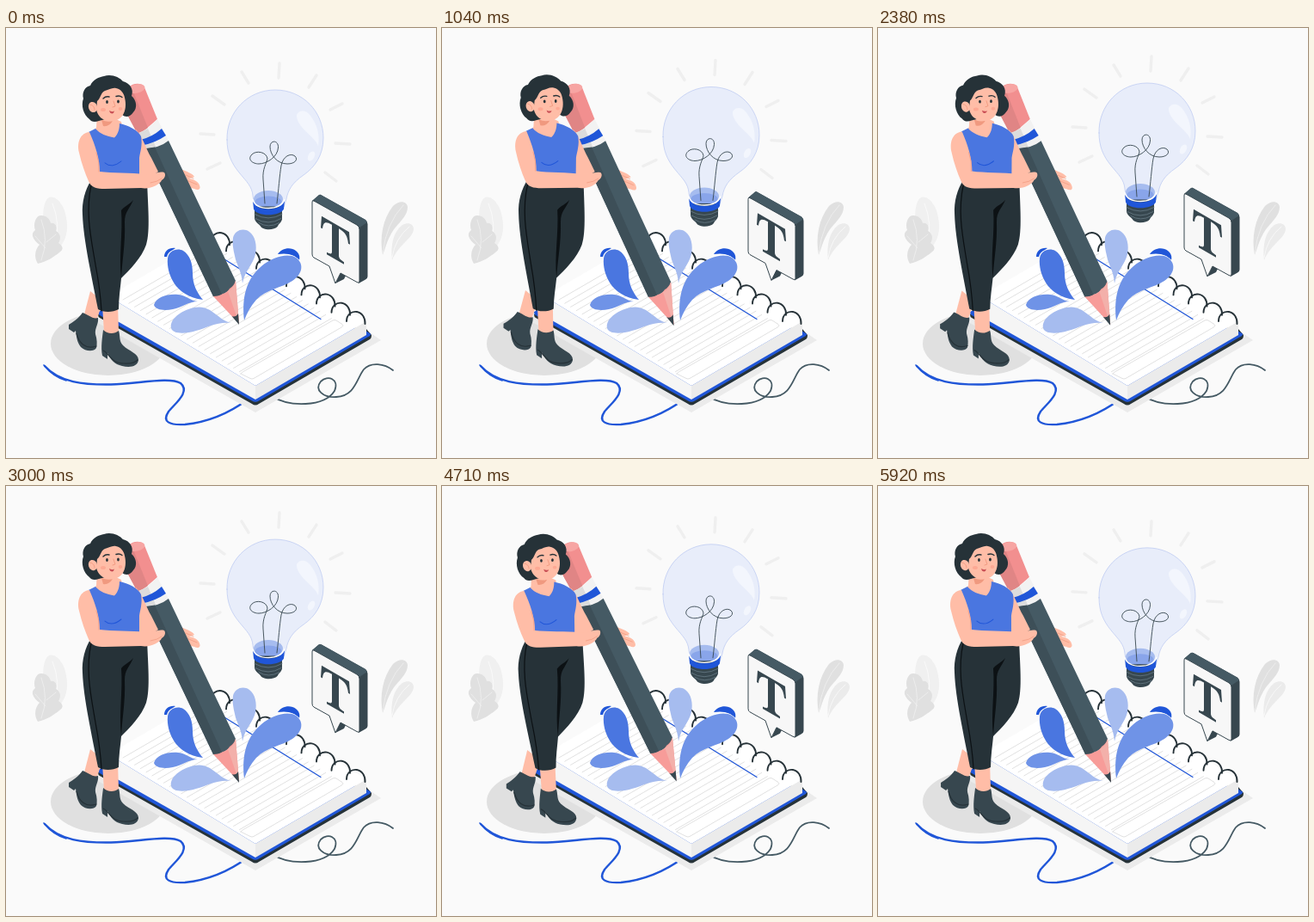
An HTML page with a canvas that plays this animation: 500 by 500 pixels, repeating every 5.96 s.

```html
<!DOCTYPE html>
<html lang="en">
<head>
<meta charset="utf-8">
<title>Creative writing</title>
<style>
html, body { margin: 0; width: 100%; height: 100%; overflow: hidden; background: #fafafa; }
canvas { display: block; width: 500px; height: 500px; }
</style>
</head>
<body>
<canvas id="stage"></canvas>
<script>
const LOOP = 5960;
const INK = '#263238', SLATE = '#455a64', DEEP = '#37474f', SKIN = '#ffbda7';
const BLUE = '#2056d8', MID = '#4a76e0', SOFT = '#6f93e7', PALE = '#a6bcef';

const canvas = document.getElementById('stage');
const ctx = canvas.getContext('2d');
const dpr = window.devicePixelRatio || 1;
canvas.width = canvas.height = 500 * dpr;

function fill(d, color) {
  ctx.fillStyle = color;
  ctx.fill(new Path2D(d));
}

function line(d, color, width = 1) {
  ctx.strokeStyle = color;
  ctx.lineWidth = width;
  ctx.stroke(new Path2D(d));
}

function oval(x, y, rx, ry, color, turn = 0) {
  ctx.beginPath();
  ctx.ellipse(x, y, rx, ry, turn, 0, 7);
  ctx.fillStyle = color;
  ctx.fill();
}

function drawLeaves() {
  fill('M50 250 C41 232 41 202 50 197 C58 194 68 206 70 220 C73 236 70 246 61 257 Z', '#f0f0f0');
  line('M54 204 Q64 228 57 255', '#fafafa', 1);
  fill('M37 274 C32 266 34 257 39 252 C31 246 28 239 34 235 C31 228 35 217 41 218 C47 218 51 222 52 227 C57 226 60 231 58 236 C64 239 64 246 61 250 C67 254 67 258 62 261 C56 266 47 272 37 274 Z', '#e0e0e0');
  line('M41 223 Q50 246 41 270 M47 249 L58 240 M46 256 L34 242', '#f0f0f0', 0.8);
  fill('M438 264 C434 244 438 222 450 207 C457 200 466 201 467 208 C467 221 453 228 447 241 C442 250 441 257 438 264 Z', '#e0e0e0');
  line('M462 206 Q442 227 438 262', '#f0f0f0', 0.8);
  fill('M449 270 C447 253 450 237 461 229 C468 225 474 228 474 234 C473 245 457 251 449 270 Z', '#ebebeb');
  line('M469 231 Q452 245 449 267', '#fafafa', 0.8);
}

function drawCables() {
  line('M45 393 C62 412 90 415 122 414.5 C152 414 190 405 203 413 C215 423 196 437 189 446 C181 458 190 462 208 461 C238 458 262 446 281 432', BLUE, 2.4);
  line('M44 392 C51 401 60 407 70 410', BLUE, 1.6);
  line('M309 428 C329 441 370 441 382 422 C388 408 374 403 366 411 C358 421 369 430 384 429 C406 428 408 407 416 397 C424 388 440 390 450 398', SLATE, 1.8);
}

function drawNotebook() {
  fill('M98 338 L290 447 L436 363 L420 352 L290 428 L116 326 Z', '#ebebeb');
  fill('M107 333 Q107 336 109 337 L286 437 Q290 440 294 437 L423 362 Q425 361 425 357 L419 350 L130 320 Z', INK);
  fill('M107 330 Q107 333 109 334 L286 433.5 Q290 436 294 433.5 L423 358 Q425 356 423 355 L415 350 L130 318 Z', BLUE);
  fill('M119 312 L290 416 L290 432 L119 335 Z', '#f5f5f5');
  fill('M290 416 L419 341 L419 357 L290 432 Z', '#ebebeb');
  fill('M119 312 L290 416 L419 341 L248 237 Z', '#ffffff');

  // ruled lines, with a closed box at the foot of the page
  const rows = 22;
  let d = 'M273 402 Q274 400.5 276 399.5 L380 340 Q382 339 384 340 L391 344.5 Q393 346 391 347.5 L288 407.5 Q286 408.5 284 407.5 L275 403 Q273 402.5 273 402 Z ';
  for (let i = 0; i < rows - 1; i++) {
    const x = 136 + 149 * i / rows, y = 316 + 92 * i / rows;
    d += `M${x} ${y} l107 -62 `;
  }
  line(d, '#dedede', 0.9);
  line('M246 264 L366 338.5', BLUE, 1.3);

  // binding rings
  for (let i = 9; i >= 0; i--) {
    const x = 408 - 17.5 * i, y = 330 - 10.2 * i;
    line(`M${x - 12} ${y + 11} C${x - 12} ${y + 3} ${x - 6} ${y - 1} ${x} ${y} C${x + 6} ${y + 1} ${x + 10} ${y + 7} ${x + 9.5} ${y + 14}`, INK, 1.9);
  }
}

function drawSplashes() {
  fill('M184 266 C184 259 190 255 197 256 L194 258 C190 260 188 262 187 266 Z', BLUE);
  fill('M188 268 C189 259 199 255 206 259 C214 264 217 274 217 285 C217 298 222 308 229 316 C213 314 201 306 195 296 C190 288 187 277 188 268 Z', MID);
  fill('M172 322 C175 313 187 309 200 310 C210 311 214 317 223 318 C212 318 205 325 194 327 C184 329 174 328 172 322 Z', SOFT);
  fill('M192 349 C190 339 202 329 219 325 C239 321 245 339 262 343 C246 341 235 348 221 352 C208 356 194 356 192 349 Z', PALE);
  fill('M264 244 C266 235 276 232 283 237 C290 242 292 253 290 263 C287 276 278 281 275 297 C274 282 268 276 266 265 C264 257 263 250 264 244 Z', PALE);
  fill('M316 263 C320 256 331 254 337 259 C341 262 342 266 341 270 C336 264 328 261 316 263 Z', BLUE);
  fill('M315 265 C326 261 337 264 342 271 L340 274 Q328 264 313 268 Z', '#ffffff');
  fill('M277 340 C274 314 279 292 297 277 C309 267 327 261 337 267 C347 274 345 286 333 294 C321 302 302 304 291 316 C284 324 280 332 277 340 Z', SOFT);
}

function drawBulb() {
  const rays = [
    [318, 41, 317, 58], [274, 51, 282, 64], [240, 79, 254, 89], [226, 123, 242, 124],
    [234, 164, 249, 157], [361, 55, 352, 69], [391, 88, 377, 95], [383, 134, 400, 135], [371, 168, 384, 178]
  ];
  for (const [a, b, c, e] of rays) line(`M${a} ${b} L${c} ${e}`, '#efefef', 3.4);

  const glass = 'M257 130 C256 98 281 72 313 72 C345 72 369 97 369 128 C369 148 359 162 346 171 C333 180 328 188 326 199 L323 208 L289 208 L287 195 C286 184 280 179 271 168 C262 157 257 146 257 130 Z';
  fill(glass, '#e8edfa');
  line(glass, '#b9c8f1', 0.7);
  fill('M338 101 C341 95 349 95 354 102 C362 112 365 125 363 137 C359 126 337 115 338 101 Z', '#f3f6fd');
  oval(355, 149, 3.5, 6, '#f3f6fd', 0.5);

  oval(305, 199, 17, 10, PALE);
  oval(305, 202, 15.5, 6.5, '#89a5ea');
  line('M301 204 L299 176 C298 164 303 157 304 152 C303 144 291 142 286 147 C280 153 287 158 294 158 C303 158 316 150 316.5 139 C317 130 307 130 307 138 C307 147 315 158 327 158 C336 158 340 153 336 149 C331 145 322 149 320 160 C318 172 317 188 315 204', DEEP, 0.9);
  ctx.save();
  ctx.translate(0, 1.5);
  fill('M289 206 L321 206 L321 221 C320 225 317 226 316 229 C312 234 299 234 296 229 C294 226 290 225 289 220 Z', DEEP);
  line('M289 215 Q305 224 321 215 M290 220 Q305 229 320 220 M294 225 Q305 232 318 225', '#62757f', 0.9);
  fill('M287 199 Q290 209 305 209 Q320 209 324 199 L323 209 C319 218 291 218 288 209 Z', BLUE);
  line('M287 198 Q290 208 305 208 Q320 208 324 198', '#ffffff', 1.3);
  ctx.restore();
}

function drawSign() {
  const front = 'M358 201 L408 229 Q411 231 411 234 L411 294 Q411 297 408 295.5 L389 285 L383 297 L376 277 L358 267 Q356 266 356 263 L356 203 Q356 200 358 201 Z';
  fill('M356 201 L363 195 Q365 193 367 194.5 L418 223 Q420.5 225 420.5 228 L420.5 289 Q420.5 291 418 292.5 L410 297 Z', DEEP);
  fill('M356 201 L363 195 Q365 193 367 194.5 L418 223 L420 226 L411 232 Z', SLATE);
  fill('M389 284 L395 288 L393 292 L383 297 Z', DEEP);
  fill(front, '#f7f7f7');
  line(front, DEEP, 1);

  ctx.save();
  ctx.transform(1, 0.577, 0, 1, 383, 246);
  fill('M-16 -18 L16 -18 L17 -4 L15 -4 C14 -12 12 -15 4 -15 L4 16 C4 20 6 20 10 20.5 L10 23 L-10 23 L-10 20.5 C-6 20 -4 20 -4 16 L-4 -15 C-12 -15 -14 -12 -15 -4 L-17 -4 Z', DEEP);
  ctx.restore();
}

function drawPencil() {
  // far hand
  fill('M203 164 C210 167 217 169 219 173 L213 175 C219 176 224 179 225 183 C227 188 223 189 219 187 L208 184 Z', SKIN);
  line('M209 171 L218 175 M210 177 L222 182', '#f0997f', 0.7);

  fill('M143 69 C147 64 158 63 161 69 L176 106 L154 125 L139 97 Z', '#f28f8f');
  fill('M143 70 L148 74 L165 116 L154 125 L139 97 Z', '#e08585');
  oval(152, 70.5, 9.5, 5.2, '#f7a5a3', -0.2);

  fill('M152 123 Q166 118 176 106 L189 131 Q177 140 160 141 Z', '#f2f2f2');
  fill('M152 123 Q160 120 165 117 L174 138 L160 141 Z', '#dcdcdc');
  fill('M155 130.5 Q170 127 181 117 L186 125 Q173 134 158 136.5 Z', BLUE);

  fill('M159.5 140.5 Q178 140 189 131 L267 294 Q266 302 258 306 Q249 313 241 312 Z', SLATE);
  fill('M159.5 140.5 L173 138.5 L251 309.5 Q246 313 241 312 Z', '#3d4f58');
  fill('M241 312 Q248 312 252 309 Q257 308 260 303 Q265 300 267 294 L271 344 Z', '#f79c99');
  fill('M258 306 Q265 302 267 294 L271 344 Z', '#f3b0aa');
  fill('M262.5 335 Q267 337 270 332 L271 345 Z', DEEP);
}

function drawLegs() {
  fill('M98 306 L91 333 C95 339 101 340 105 340 L113 318 Z', SKIN);
  fill('M89 331 C95 333 101 339 107 337 C108 344 103 349 104 356 C106 362 106 368 105 372 C102 377 92 376 87 371 C83 366 82 360 81 352 L79 354 L73 350 L73 345 C78 342 84 338 89 331 Z', DEEP);
  fill('M112 322 L114 354 C119 359 127 358 131 354 L130 322 Z', SKIN);
  fill('M113 351 C118 356 126 356 131 352 C133 357 131 364 136 369 C143 376 154 378 154 386 C153 394 144 395 135 393 C126 391 122 386 118 378 L118 385 L112 381 C110 371 112 360 113 351 Z', DEEP);
  line('M82 355 C85 367 93 374 105 370 M113 375 C120 378 122 390 137 390 Q148 391 153 386', INK, 1.2);

  fill('M99 177 C92 188 88 202 89 217 C90 247 100 290 107 327 C113 331 124 331 131 327 C131 314 133 302 134 291 C143 282 158 267 163 252 C168 236 165 207 164 177 Z', INK);
  line('M99 183 C92 215 99 245 104 275 C108 296 110 311 111 329', '#0c1114', 1.2);
  fill('M134 212 C139 206 143 206 148 200 C143 212 138 213 138 226 C139 250 135 270 134 291 C131 266 136 238 134 212 Z', '#0c1114');
}

function drawTorso() {
  fill('M151 118 C158 124 162 139 169 151 L177 167 L166 174 L153 169 Z', SKIN);
  fill('M106 99 L105 116 L98 123 L117 139 L137 125 L134 109 L122 103 Z', SKIN);
  fill('M111 107 Q118 110 124 108 Q120 115 113 114 Z', '#f0997f');
  fill('M104 117 C109 123 117 126 126 127.5 C131 123 132 116 132 111 C142 113 154 119 157 126 C159 136 156 144 155 151 L155 172 L107 172 C108 152 100 137 96 121 Z', MID);
  line('M115 157 Q123 164 134 155', BLUE, 1);
  fill('M97 121 C87 122 82 132 85 145 C88 158 92 169 96 178 C99 186 106 187 115 187 L157 186 C168 188 179 182 181 177 C185 175 186 170 184 168 C178 166 169 171 162 170 C146 168 122 169 109 167 C109 152 104 137 97 121 Z', SKIN);
  line('M105 145 Q109 156 108 167 M168 180 Q176 179 181 175', '#f0997f', 0.7);
}

function drawHead() {
  fill('M97 106 C90 101 87 90 90 82 C88 75 92 68 98 67 C101 60 108 57 114 56 C122 53 132 57 136 62 C144 64 149 71 146 79 C152 84 153 93 148 98 C144 104 139 104 135 101 L108 108 C103 110 99 109 97 106 Z', INK);
  fill('M106 85 C110 82 110 75 115 73 C120 72 123 69 128 70 C133 71 137 75 138 81 C140 89 139 96 136 101 C132 107 126 109 119 108 C112 107 107 103 105 95 Z', SKIN);
  oval(101, 92, 5, 6.2, SKIN, -0.3);
  line('M98 89 Q103 90 103 95', '#f0997f', 0.8);
  oval(117.5, 86, 1.4, 1.9, INK);
  oval(130.5, 85.5, 1.4, 1.9, INK);
  line('M113 82 Q116 79 120 80 M128 79.5 Q132 78 135 80.5', INK, 1.4);
  line('M125 85 L127 91 L124 92', '#f0997f', 0.9);
  fill('M120 96 Q123 98 126 96.5 Q125 101 121 98.5 Z', '#c94f55');
  oval(113, 95, 3, 2, '#fda994');
  oval(133, 94, 2.3, 1.9, '#fda994');
}

// triangle wave: 0 -> 1 -> 0 over one phase
const tri = p => 1 - Math.abs(2 * (((p % 1) + 1) % 1) - 1);

function render(time) {
  const p = (time % LOOP) / LOOP;
  const lift = -10 * tri(p);
  const angle = (2 * tri(p + 0.25) - 1) * Math.PI / 180;

  ctx.setTransform(dpr, 0, 0, dpr, 0, 0);
  ctx.fillStyle = '#fafafa';
  ctx.fillRect(0, 0, 500, 500);
  ctx.lineCap = ctx.lineJoin = 'round';

  drawLeaves();
  oval(119, 367, 67, 37, '#e0e0e0');
  drawCables();
  drawNotebook();
  drawSplashes();

  ctx.save();
  ctx.translate(0, lift);
  drawBulb();
  drawSign();
  ctx.restore();

  ctx.save();
  ctx.translate(171, 225);
  ctx.rotate(angle);
  ctx.translate(-171, -225);
  drawPencil();
  drawLegs();
  drawTorso();
  drawHead();
  ctx.restore();
}

const start = performance.now();
function tick() {
  render(performance.now() - start);
  requestAnimationFrame(tick);
}
tick();
</script>
</body>
</html>
```
